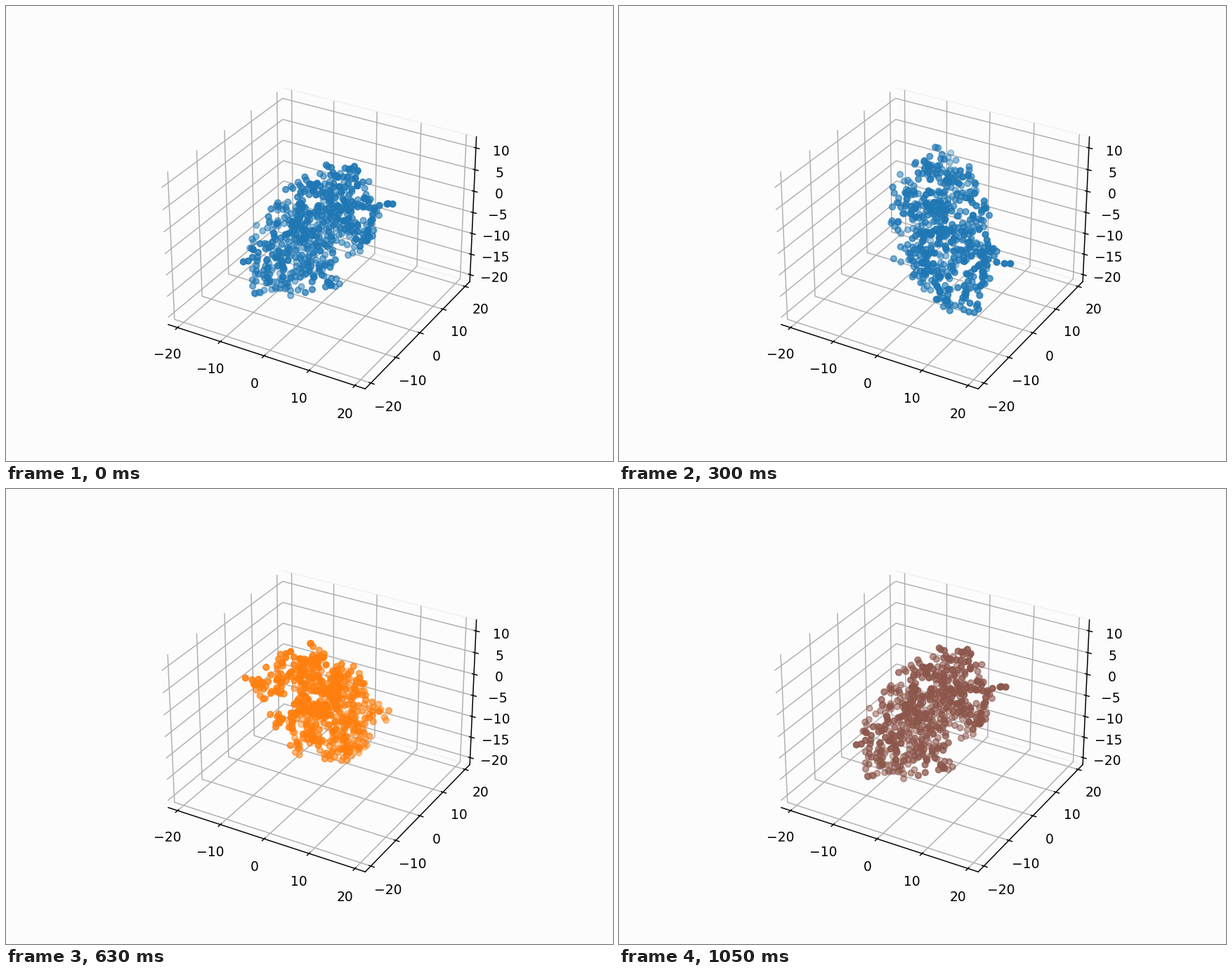
Animation of 864x648 px, one loop 1.08 s. Source, as a matplotlib script:

```python
import matplotlib.pyplot as plt
import numpy as np
from matplotlib.animation import ArtistAnimation

FRAMES = 36
COUNT = 550
STEP = 1.3
BG = "#fcfcfc"

# Ends of the longest arms: right, front and height as first seen
ARMS = np.array([(-15.1, 11.5, -4.8), (14.3, 6.0, 5.8),
                 (-12.8, 4.2, -17.2), (8.8, 10.6, 0.3)])


def random_goal(rng):
    """A point in a leaning ellipsoid, the overall shape of the cluster."""
    d = rng.normal(size=3)
    d *= rng.random() ** 0.4 / np.linalg.norm(d)
    right, front, height = d * (13.4, 11.4, 15.8) + (0, 1.3, -3.9)
    return np.array([right + 0.3 * height, front, height])


def grow_cluster(rng):
    """Grow a tree of touching particles out of the origin."""
    nodes = [np.zeros(3)]

    def nearest(p):
        gaps = np.linalg.norm(np.array(nodes) - p, axis=1)
        i = gaps.argmin()
        return nodes[i], gaps[i]

    def step(start, goal):
        way = goal - start
        return start + STEP * way / np.linalg.norm(way) + rng.normal(0, 0.35, 3)

    for tip in ARMS:
        p, gap = nearest(tip)
        while gap > STEP:
            p = step(p, tip)
            nodes.append(p)
            gap = np.linalg.norm(tip - p)

    while len(nodes) < COUNT:
        goal = random_goal(rng)
        start, gap = nearest(goal)
        if gap > 0.8:
            p = step(start, goal)
            if nearest(p)[1] > 0.9:
                nodes.append(p)
    return np.array(nodes)


def turn(points, angle):
    right, front, height = points.T
    c, s = np.cos(angle), np.sin(angle)
    return right * c + front * s, right * s - front * c, height


fig = plt.figure(figsize=(6.4, 4.8), dpi=135, facecolor=BG)
ax = fig.add_subplot(projection="3d", facecolor=BG)
ax.view_init(elev=30, azim=-60)

for axis, edge in ((ax.xaxis, "none"), (ax.yaxis, "#ececec"), (ax.zaxis, "none")):
    axis.pane.set(facecolor="none", edgecolor=edge)

cluster = grow_cluster(np.random.default_rng(7))
angles = np.radians(30) + np.linspace(0, 2 * np.pi, FRAMES)
shots = [
    [ax.scatter(*turn(cluster, a), color=f"C{i % 10}", visible=i == 0)]
    for i, a in enumerate(angles)
]

ax.set(xlim=(-22.2, 22.2), ylim=(-22.2, 22.2), zlim=(-21.7, 12.5),
       xticks=range(-20, 21, 10), yticks=range(-20, 21, 10),
       zticks=range(-20, 11, 5))

anim = ArtistAnimation(fig, shots, interval=30, repeat=True)
plt.show()
```
